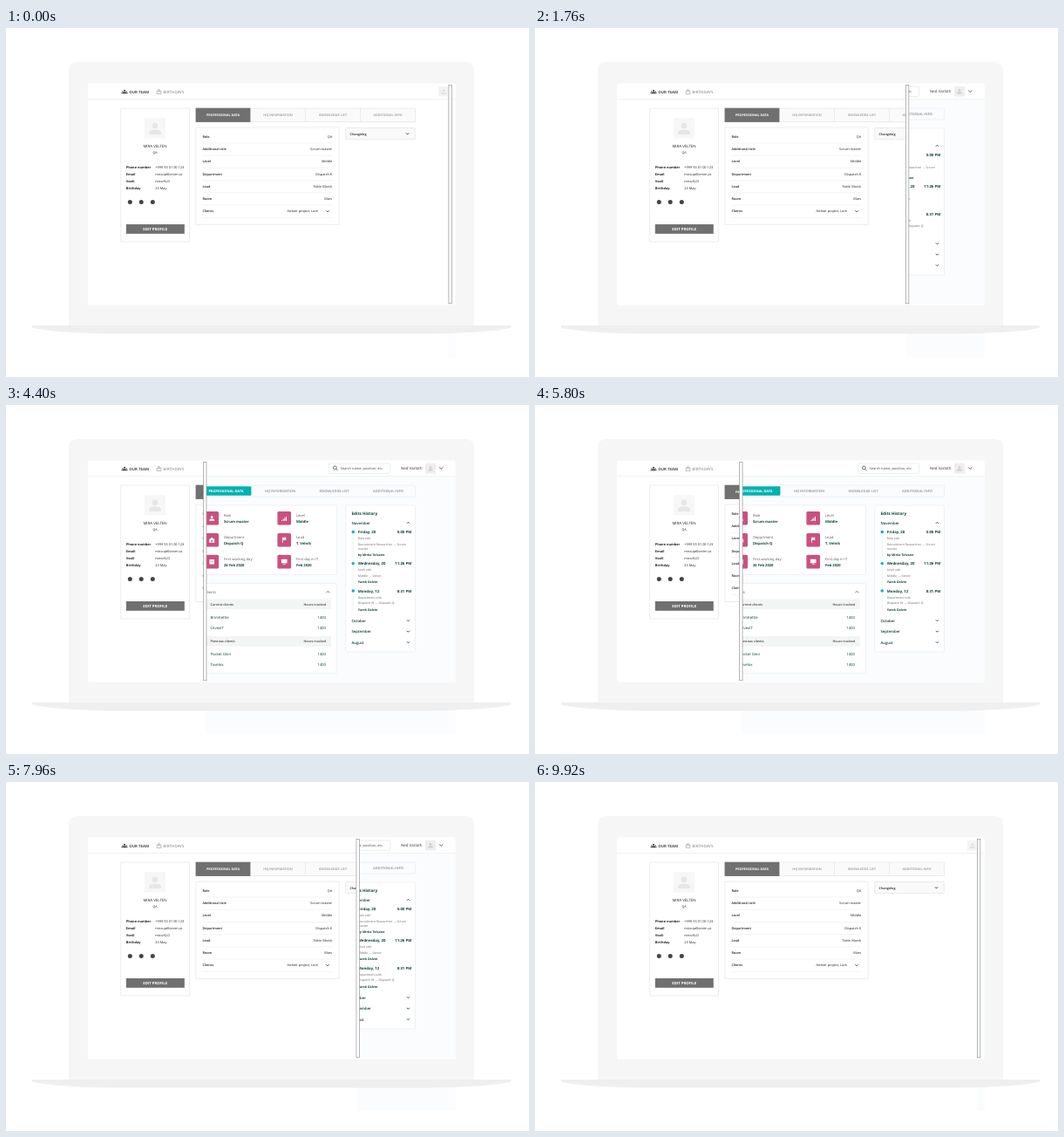
An HTML page that plays this animation: 600 px wide and 400 px high, repeating every 10000 ms.

```html
<!DOCTYPE html>
<html lang="en">
<head>
<meta charset="utf-8">
<title>Profile page before and after</title>
<style>
html, body { margin: 0; width: 100%; height: 100%; overflow: hidden; background: #fff; }
svg { display: block; width: 600px; height: 400px; }
text { font-family: "Open Sans", "Noto Sans", sans-serif; text-rendering: geometricPrecision; white-space: pre; }
</style>
</head>
<body>
<svg id="stage" viewBox="0 0 600 400" xmlns="http://www.w3.org/2000/svg"></svg>
<script>
const LOOP = 10000, STEP = 40, LEFT = 216.2, RIGHT = 509.6;
const INK = "#222", GREEN = "#12403b", TEAL = "#00b3b0", PINK = "#c9517f";

const text = (x, y, str, size, weight = 400, fill = INK, anchor = "start") =>
  `<text x="${x}" y="${y + size * 0.36}" font-size="${size}" font-weight="${weight}" fill="${fill}" text-anchor="${anchor}">${str}</text>`;
const rect = (x, y, w, h, fill, stroke = "none", r = 0, sw = 0.7) =>
  `<rect x="${x}" y="${y}" width="${w}" height="${h}" rx="${r}" fill="${fill}" stroke="${stroke}" stroke-width="${sw}"/>`;
const dot = (x, y, r, fill) => `<circle cx="${x}" cy="${y}" r="${r}" fill="${fill}"/>`;
const path = (d, fill, stroke = "none", sw = 0.8) =>
  `<path d="${d}" fill="${fill}" stroke="${stroke}" stroke-width="${sw}"/>`;
const rule = (x1, x2, y, stroke) => path(`M${x1} ${y}H${x2}`, "none", stroke, 0.6);
const chevron = (x, y, up, w = 1.5, color = "#222", sw = 0.9) => {
  const h = up ? -w / 2 : w / 2;
  return path(`M${x - w} ${y - h}L${x} ${y + h}L${x + w} ${y - h}`, "none", color, sw);
};
const person = (x, y, s, fill) =>
  dot(x, y - s * 0.45, s * 0.48, fill) +
  path(`M${x - s} ${y + s}V${y + s * 0.7}Q${x - s} ${y + s * 0.2} ${x} ${y + s * 0.2}T${x + s} ${y + s * 0.7}V${y + s}Z`, fill);

function laptop() {
  return path("M72 341V49Q72 39 82 39H527Q537 39 537 49V341Z", "#f6f6f6") +
    path("M30 341H579V343.5C560 348.8 505 350.6 470 350.6H139C104 350.6 49 348.8 30 343.5Z", "#efefef") +
    rect(94, 63.5, 421.5, 254.5, "#fff", "none", 3);
}

function oldPage() {
  let s = rule(94, 515, 81.5, "#e6e6e6");

  // header
  s += person(133.7, 73.4, 1.5, "#666") + person(138.3, 73.4, 1.5, "#666") + person(136, 72.9, 2.3, "#444");
  s += text(141.3, 73, "OUR TEAM", 4.35, 700, "#4a4a4a");
  s += path("M173 75.5V72.8H178V75.5ZM174 72.8V71.2H177V72.8M175.5 71.2V69.8", "none", "#999", 0.6);
  s += text(180.3, 73, "BIRTHDAYS", 4.5, 600, "#999");
  s += rect(496, 67, 12, 11.5, "#f3f3f3") + person(502, 73, 3, "#e2e2e2");

  // profile card
  s += rect(131.8, 92, 78.6, 153, "#fff", "#e6e6e6");
  s += rect(159, 103, 24, 23.5, "#f7f7f7") + person(171, 115, 7, "#e7e7e7");
  s += text(171, 135.5, "MIRA VELTEN", 4.4, 400, INK, "middle");
  s += text(171, 142.3, "QA", 3.7, 400, INK, "middle");
  [["Phone number", "+999 55 01 00 123"], ["Email", "mira.qellorvim.zz"], ["Vooli", "mira.KLO"], ["Birthday", "23 May"]]
    .forEach(([label, value], i) => {
      const y = 159.2 + i * 8.25;
      s += text(137.8, y, label, 3.85, 700) + text(171.3, y, value, 3.9);
    });
  for (const x of [142.3, 155.2, 168.3]) s += dot(x, 199.6, 2.5, "#444");
  s += rect(137.8, 225, 67, 10.8, "#707070");
  s += text(171.2, 230.4, "EDIT PROFILE", 4.25, 700, "#fff", "middle");

  // tabs
  s += rect(218, 92, 251.5, 15.6, "#fafafa", "#e4e4e4");
  s += path("M343.5 92V107.6M406.5 92V107.6", "none", "#e4e4e4", 0.7);
  s += rect(217.6, 91.7, 62.8, 16.2, "#707070");
  s += text(249, 100, "PROFESSIONAL DATA", 3.7, 700, "#fff", "middle");
  ["HQ INFORMATION", "KNOWLEDGE LIST", "ADDITIONAL INFO"].forEach((label, i) =>
    s += text(312 + i * 63, 100, label, 3.8, 600, "#999", "middle"));

  // data table
  s += rect(217.9, 114, 164.2, 111.4, "#fff", "#e6e6e6");
  [["Role", "QA"], ["Additional role", "Scrum master"], ["Level", "Middle"], ["Department", "Dispatch K"],
   ["Lead", "Tobin Marsk"], ["Room", "Mars"], ["Clients", "Amber project, Lom"]].forEach(([label, value], i) => {
    const y = 124.6 + i * 14.22;
    s += text(225.4, y, label, 3.85, 600) + text(i === 6 ? 358 : 374.2, y, value, 3.85, 400, INK, "end");
    s += rule(225.4, 374.5, y + 7.4, "#ececec");
  });
  s += chevron(369, 210, false);

  s += rect(389.8, 114.7, 79.4, 12.6, "#fafafa", "#e4e4e4");
  return s + text(394.5, 121.2, "Changelog", 3.75, 600) + chevron(460.5, 121.2, false);
}

function iconArt(kind, x, y) {
  const w = "#fff";
  switch (kind) {
    case "person": return person(x, y, 2.9, w);
    case "chart": return [0, 1, 2, 3].map(i => rect(x - 3 + i * 1.6, y + 2 - i * 1.3, 1, 1 + i * 1.3, w)).join("");
    case "office": return path(`M${x - 3} ${y + 3}V${y - 0.6}L${x} ${y - 3}L${x + 3} ${y - 0.6}V${y + 3}Z`, w) + rect(x - 1, y + 0.3, 2, 1.6, PINK);
    case "flag": return path(`M${x - 1.8} ${y + 3.2}V${y - 2.8}`, "none", w) + path(`M${x - 1.8} ${y - 3}H${x + 2.6}L${x + 1.5} ${y - 1.5}L${x + 2.6} ${y}H${x - 1.8}Z`, w);
    case "date": return rect(x - 2.8, y - 2.5, 5.6, 5.5, w, "none", 0.6) + rect(x - 1.6, y - 0.5, 1, 1, PINK) + rect(x + 0.6, y - 0.5, 1, 1, PINK);
    default: return rect(x - 3.3, y - 2.8, 6.6, 4.5, w, "none", 0.5) + rect(x - 1.6, y + 2.2, 3.2, 0.8, w);
  }
}

function newPage() {
  const edge = "#e8ecef", grey = "#666";
  let s = rect(94, 63, 422, 256, "#fafcfe") + rect(94, 63, 422, 18.5, "#fff") + rule(94, 516, 81.6, edge);

  // header
  s += rect(370.2, 67, 70.5, 11.4, "#fff", "#e2e6e8", 1);
  s += `<circle cx="377.4" cy="72" r="1.9" fill="none" stroke="#333" stroke-width=".7"/>` + path("M378.8 73.4L380.6 75.2", "none", "#333", 0.7);
  s += text(383.6, 72.5, "Search name, position, etc.", 3.95, 400, "#444");
  s += text(477.6, 72.6, "Ned Varloth", 4.45, 400, "#333", "end");
  s += rect(481, 66.7, 12, 11.8, "#eeeeee") + person(487, 72.6, 2.8, "#cfcfcf");
  s += chevron(499.2, 72.4, false, 2.1, "#333", 0.8);

  // tabs
  s += rect(218, 92, 251.5, 13, "#fafcfe", edge, 1);
  s += rect(218.2, 93.2, 63.2, 10.6, TEAL, "none", 1);
  s += text(252.4, 98.5, "PROFESSIONAL DATA", 3.9, 700, "#fff", "middle");
  ["HQ INFORMATION", "KNOWLEDGE LIST", "ADDITIONAL INFO"].forEach((label, i) =>
    s += text(314.5 + i * 62, 98.5, label, 4, 600, "#8a8f92", "middle"));

  // facts
  s += rect(218, 115, 161.6, 79.4, "#fff", edge, 1);
  [["person", "Role", "Scrum master"], ["chart", "Level", "Middle"], ["office", "Department", "Dispatch Q"],
   ["flag", "Lead", "T. Velnik"], ["date", "First working day", "26 Feb 2020"], ["screen", "First day in IT", "Feb 2020"]]
    .forEach(([kind, label, value], i) => {
      const x = 228.4 + (i % 2) * 83, y = 129.8 + Math.floor(i / 2) * 24.9;
      s += rect(x, y - 7.8, 15.6, 15.6, PINK, "none", 1.5) + iconArt(kind, x + 7.8, y);
      s += text(x + 21.6, y - 3.5, label, 4.1, 400, "#555") + text(x + 21.6, y + 3.6, value, 4.1, 700, GREEN);
    });

  // clients
  s += rect(218, 204.3, 161.6, 103, "#fff", edge, 1);
  s += text(227.8, 214.2, "Clients", 4.2, 400, "#555") + chevron(369.3, 214.3, true, 1.9, "#555", 0.8);
  [["Current clients", 222.4, ["BrimKettle", "OrvexIT"]], ["Previous clients", 265, ["Pocket Glen", "Tuvelox"]]]
    .forEach(([title, y, names]) => {
      s += rect(228.4, y, 144.6, 11.7, "#f3f4f4");
      s += text(234.4, y + 5.8, title, 3.75, 600, "#444") + text(367, y + 5.8, "Hours tracked", 3.75, 600, "#444", "end");
      names.forEach((name, i) => {
        const row = y + 20.8 + i * 11.8;
        s += text(234.4, row, name, 4.3, 400, GREEN) + text(367, row, "1400", 4.3, 400, GREEN, "end");
      });
    });

  // history
  s += rect(389.8, 115, 79.6, 168, "#fff", edge, 1);
  s += text(396.4, 124.7, "Edits History", 4.7, 700, GREEN);
  s += text(396.4, 135, "November", 4.25, 600, GREEN) + chevron(461.4, 135, true, 1.5, GREEN);
  s += path("M398.2 145.5V236", "none", "#dfe7e9", 0.6);
  [[145.5, "Friday, 20", "5:00 PM", ["Role edit", "Recruitment Researcher → Scrum", "master"], "by Mirka Tolvane"],
   [181.6, "Wednesday, 20", "11:26 PM", ["Level edit", "Middle → Senior"], "Yarek Dolvin"],
   [213, "Monday, 12", "8:31 PM", ["Department edit", "Dispatch W → Dispatch Q"], "Yarek Dolvin"]]
    .forEach(([y, day, hour, lines, author]) => {
      s += dot(398.2, y, 1.7, TEAL) + text(403.8, y, day, 4.3, 700, GREEN) + text(465.2, y, hour, 4.3, 700, GREEN, "end");
      lines.forEach((line, i) => s += text(403.8, y + [7.5, 13.8, 18.9][i], line, 3.5, 400, grey));
      s += text(403.8, y + (lines.length > 2 ? 26 : 21.4), author, 3.6, 700, GREEN);
    });
  ["October", "September", "August"].forEach((month, i) => {
    const y = 247 + i * 12.5;
    s += text(396.4, y, month, 4.25, 600, GREEN) + chevron(461.4, y, false, 1.5, GREEN);
  });
  return s;
}

const stage = document.getElementById("stage");
stage.innerHTML = `
  <defs>
    <clipPath id="screen"><rect x="94" y="63.5" width="421.5" height="254.5" rx="3"/></clipPath>
    <clipPath id="after"><rect id="cut" y="60" height="320" width="400"/></clipPath>
  </defs>
  <g clip-path="url(#after)">${rect(94, 320, 421.5, 57, "#fbfcfe")}</g>
  ${laptop()}
  <g clip-path="url(#screen)">
    ${oldPage()}
    <g clip-path="url(#after)">${newPage()}</g>
  </g>
  <g id="bar">${rect(-1.7, 65.4, 3.4, 250.4, "#fff", "#999", 0, 0.7)}</g>`;

const bar = document.getElementById("bar");
const cut = document.getElementById("cut");

// mostly a sine ease with a slight linear part
const ease = u => 0.93 * (1 - Math.cos(Math.PI * u)) / 2 + 0.07 * u;

function draw(ms) {
  const t = Math.floor((ms % LOOP) / STEP) * STEP;
  const half = LOOP / 2;
  const x = RIGHT - (RIGHT - LEFT) * ease(1 - Math.abs(t - half) / half);
  bar.setAttribute("transform", `translate(${x.toFixed(2)} 0)`);
  cut.setAttribute("x", (x + (321 - x) * 0.013).toFixed(2));
}

const start = performance.now();
function loop() {
  draw(performance.now() - start);
  requestAnimationFrame(loop);
}
loop();
</script>
</body>
</html>
```
